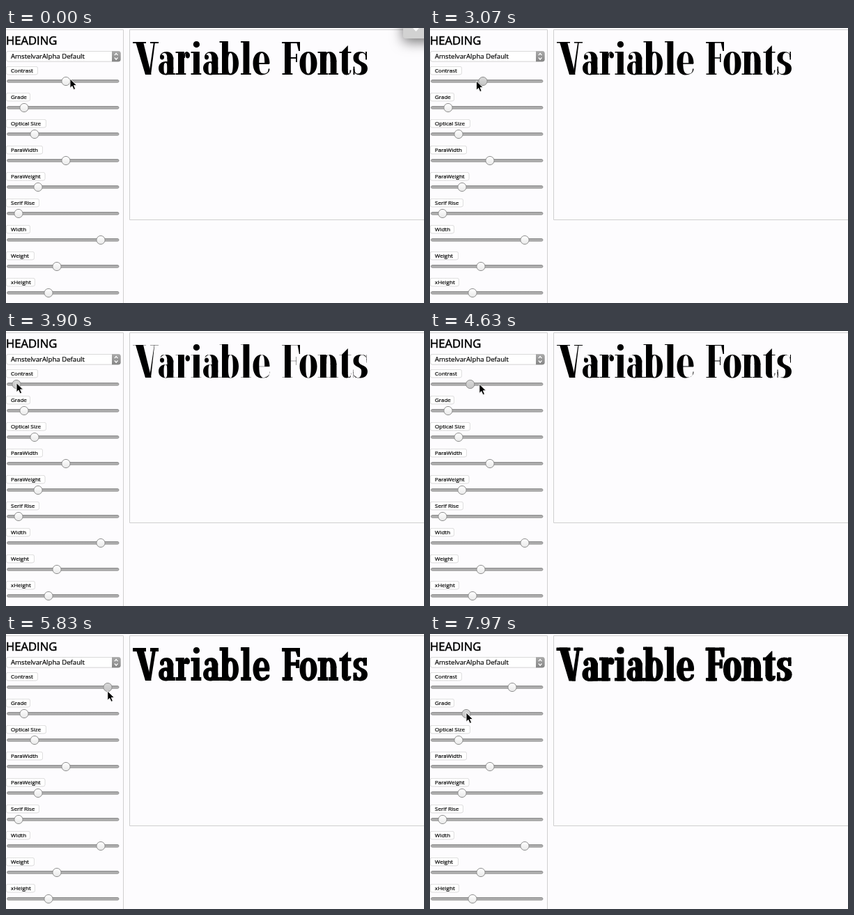
Recreate the animation shown at these times as an HTML page. Size 600x395 px, loop 8 s.

```html
<!DOCTYPE html>
<html lang="en">
<head>
<meta charset="utf-8">
<title>Variable font sliders</title>
<style>
html, body { margin: 0; width: 100%; height: 100%; overflow: hidden; background: #fdfcfe; }
svg { display: block; width: 600px; height: 395px; font: 8px "Open Sans", "Noto Sans", sans-serif; }
text { stroke: #000; stroke-width: .2; }
.tab { filter: drop-shadow(0 5px 9px rgba(0, 0, 0, .55)); }
.chip { filter: drop-shadow(0 .6px .5px rgba(0, 0, 0, .22)); }
</style>
</head>
<body>
<svg viewBox="0 0 600 395">
  <defs>
    <linearGradient id="rail" x2="0" y2="1">
      <stop stop-color="#888"/><stop offset=".45" stop-color="#b8b8b8"/><stop offset="1" stop-color="#aaa"/>
    </linearGradient>
    <linearGradient id="grip" x2="0" y2="1"><stop stop-color="#fff"/><stop offset="1" stop-color="#e9e9e9"/></linearGradient>
    <linearGradient id="held" x2="0" y2="1"><stop stop-color="#d9d9d9"/><stop offset="1" stop-color="#c5c5c5"/></linearGradient>
    <linearGradient id="arrows" x2="0" y2="1"><stop stop-color="#aaa"/><stop offset="1" stop-color="#858585"/></linearGradient>
  </defs>
  <path d="M0 2.5H168.5V395M600 2.5H177.5V275.5H600" fill="none" stroke="#cfcfcf"/>
  <text y="23.5" font-size="16.6" style="stroke-width:.55">HEADING</text>
  <g class="chip">
    <rect x=".5" y="33.5" width="163.5" height="14.5" rx="3" fill="#fff" stroke="#d4d4d4" stroke-width=".7"/>
    <path d="M152 33.3h9.5q3 0 3 3v9q0 3-3 3h-9.5z" fill="url(#arrows)"/>
    <path d="M155.8 39.2l2.3-2.7 2.3 2.7M155.8 42.5l2.3 2.7 2.3-2.7" fill="none" stroke="#fff" stroke-width="1.2"/>
  </g>
  <text x="7" y="44.3" font-size="9.65">AmstelvarAlpha Default</text>
  <g id="sliders"></g>
  <g id="word" role="img" aria-label="Variable Fonts" fill-rule="evenodd" stroke="#000" stroke-linejoin="round"></g>
  <g id="tab">
    <g class="tab"><rect x="570" y="-20" width="50" height="35" rx="4" fill="#d2d2d2"/></g>
    <path d="M584 0h9l-4.5 5z" fill="#fafafa"/>
  </g>
  <path id="pointer" d="M0 0V13.2L3 10.4 5.2 15.4 7.6 14.4 5.5 9.5H9.6Z" stroke="#fff" stroke-width=".9"/>
</svg>
<script>
const $ = id => document.getElementById(id);
const LOOP = 8000, CAP = 20, TOP = 34, BASE = 67;

// label, label width, knob position
const sliders = [
  ['Contrast', 45, 86], ['Grade', 34, 26], ['Optical Size', 57, 41],
  ['ParaWidth', 52, 86], ['ParaWeight', 55.5, 46], ['Serif Rise', 47, 18],
  ['Width', 34, 136], ['Weight', 40, 73], ['xHeight', 41, 61]
];
$('sliders').innerHTML = sliders.map(([name, width, x], i) => `
  <g transform="translate(0 ${i * 38})">
    <rect class="chip" x=".4" y="55.4" width="${width}" height="11.4" rx="2.5" fill="#fff" stroke="#d8d8d8" stroke-width=".6"/>
    <text x="7" y="64">${name}</text>
    <rect x="1.5" y="74.6" width="160.5" height="3.6" rx="1.8" fill="url(#rail)" stroke="#808080" stroke-width=".7"/>
    <circle cx="${x}" cy="76.5" r="6.1" fill="url(#grip)" stroke="#858585" stroke-width=".9"/>
  </g>`).join('');
const knobs = document.querySelectorAll('circle');

// Progress from 0 to 1 between two times, slow at both ends.
function ease(t, from, to) {
  const p = Math.min(1, Math.max(0, (t - from) / (to - from)));
  return p * p * (3 - 2 * p);
}
const contrastAt = t => 86 - 71 * ease(t, 2830, 3850) + 131 * ease(t, 4020, 5620) - 28 * ease(t, 5920, 6330);
const gradeAt = t => 26 + 11 * ease(t, 7130, 7430) + 15 * ease(t, 7630, 7970);

// The knob trails the pointer by a short lag.
function pointerAt(t) {
  const lead = contrastAt(t + 110), settle = ease(t, 0, 200);
  const x = lead + 6 - 9 * settle + 3 * ease(t, 2830, 3070) - 92 * ease(t, 6330, 7090) + gradeAt(t) - 26;
  const y = 74.5 + .00035 * lead ** 2 - 4 * (1 - settle) + 33.6 * ease(t, 6330, 6900);
  return [x, y];
}

// Glyph parts as path data; h is the hairline weight.
const box = (x, y, w, h) => `M${x} ${y}h${w}v${h}h${-w}z`;
const poly = (...points) => `M${points.join(' ')}z`;
function oval(x, y, w, h, k = .6) {
  const a = w / 2, b = h / 2, p = a * k, q = b * k, cx = x + a, cy = y + b;
  return `M${cx} ${y}C${cx + p} ${y} ${x + w} ${cy - q} ${x + w} ${cy}S${cx + p} ${y + h} ${cx} ${y + h}` +
    `S${x} ${cy + q} ${x} ${cy}S${cx - p} ${y} ${cx} ${y}z`;
}
const ring = (x, y, w, h, l, r, t) => oval(x, y, w, h) + oval(x + l, y + t, w - l - r, h - 2 * t, .72);
// Half ring with its crown at y; negative heights turn it upside down.
function arch(x, y, w, l, r, t, hl, hr) {
  const c = x + w / 2, il = x + l, ir = x + w - r, m = (il + ir) / 2, yi = y + t * Math.sign(hl);
  const k = .4, yl = y + hl, yr = y + hr, p = w * .3, q = (ir - il) * .36;
  return `M${x} ${yl}C${x} ${y + hl * k} ${c - p} ${y} ${c} ${y}S${x + w} ${y + hr * k} ${x + w} ${yr}` +
    `H${ir}C${ir} ${yi + hr * k * .7} ${m + q} ${yi} ${m} ${yi}S${il} ${yi + hl * k * .7} ${il} ${yl}z`;
}

function word(h) {
  const s = 8.8, mid = 51;
  const stem = (x, y) => [box(x + 4, y, s, BASE - y), box(x + .5, y, 4, h), box(x + .5, BASE - h, s + 6, h)];
  const a = x => [
    box(x + 12.5, 42, s, BASE - 42),
    arch(x + 2, TOP, 10.5 + s, h, s, h, 8, 11),
    oval(x + 2, 38.5, 6, 7),
    ring(x, 48, 12.5 + s, BASE - 47.5, 7.5, s, h),
    box(x + 12.5, BASE - h, s + 2.5, h)
  ];
  const V = [
    poly(186, CAP, 197, CAP, 208.5, BASE, 200, BASE),
    poly(213 - h / 2, CAP, 213 + h / 2, CAP, 208, BASE, 206 - h / 2, BASE),
    box(182, CAP, 19, h), box(207, CAP, 12, h)
  ];
  const r = [...stem(243, TOP), arch(255, TOP, 8.5, h, h, h, 9, 6), oval(257.5, TOP + 1, 6.5, 8.5)];
  const i = [...stem(265, TOP), oval(268.8, 19, 9.2, 9.2)];
  const b = [...stem(306, CAP - 1), ring(310, TOP, 24, BASE - TOP + .5, s, s - .6, h)];
  const e = [
    arch(354.5, TOP, 24, s, s - 1.5, h, mid - TOP, mid - TOP),
    arch(354.5, BASE + .5, 24, s, h, h, mid - BASE - .5, -9),
    box(361, mid - h / 2, 17, h)
  ];
  const F = [
    ...stem(396, CAP), box(396, CAP, 26, h),
    poly(419 - h, CAP, 422, CAP, 422, CAP + 13, 421 - h / 2, CAP + 13),
    box(408, 43 - h / 2, 9, h), box(416, 37, h, 12)
  ];
  const o = [ring(421.5, TOP, 25, BASE - TOP + .5, s, s, h)];
  const n = [
    ...stem(447, TOP), arch(454, TOP, 20.5, s - 3, s, h, 13, 14),
    box(474.5 - s, 47, s, BASE - 47), box(463, BASE - h, 14, h)
  ];
  const t = [
    poly(482, TOP, 482 + s, 25, 482 + s, 60, 482, 60),
    arch(482, BASE + .5, 13.5, s, h, h, -8, -7), box(478.5, TOP, 17, h)
  ];
  const x = 498.5, w = 20.5, u = TOP + 9, v = BASE - 9;
  const S = [
    arch(x, TOP, w - 1, s - 1, h, h, 9, 8),
    arch(x, BASE + .5, w, h, s, h, -8.5, -9.5),
    `M${x} ${u}C${x} 53 ${x + w - s} 50 ${x + w - s} ${v}H${x + w}C${x + w} 48 ${x + s - 1} 51 ${x + s - 1} ${u}z`,
    box(x + w - 1 - h, TOP, h, 11.5), box(x, BASE - 11.5, h, 11.5)
  ];
  return [V, a(219), r, i, a(283), b, stem(336.5, CAP - 1), e, F, o, n, t, S].flat();
}

function setKnob(i, x, held) {
  knobs[i].setAttribute('cx', x);
  knobs[i].setAttribute('fill', held ? 'url(#held)' : 'url(#grip)');
}

function draw(now) {
  const t = now % LOOP, contrast = contrastAt(t), grade = gradeAt(t);
  setKnob(0, contrast, t >= 2570 && t < 6330);
  setKnob(1, grade, t >= 7130);
  const hairline = .35 + 4.7 * ((contrast - 5) / 140) ** 2;
  $('word').innerHTML = word(hairline).map(d => `<path d="${d}"/>`).join('');
  $('word').setAttribute('stroke-width', (grade - 26) * .045);
  $('tab').style.display = t < 1430 ? '' : 'none';
  $('pointer').setAttribute('transform', `translate(${pointerAt(t)})`);
  requestAnimationFrame(draw);
}
requestAnimationFrame(draw);
</script>
</body>
</html>
```
